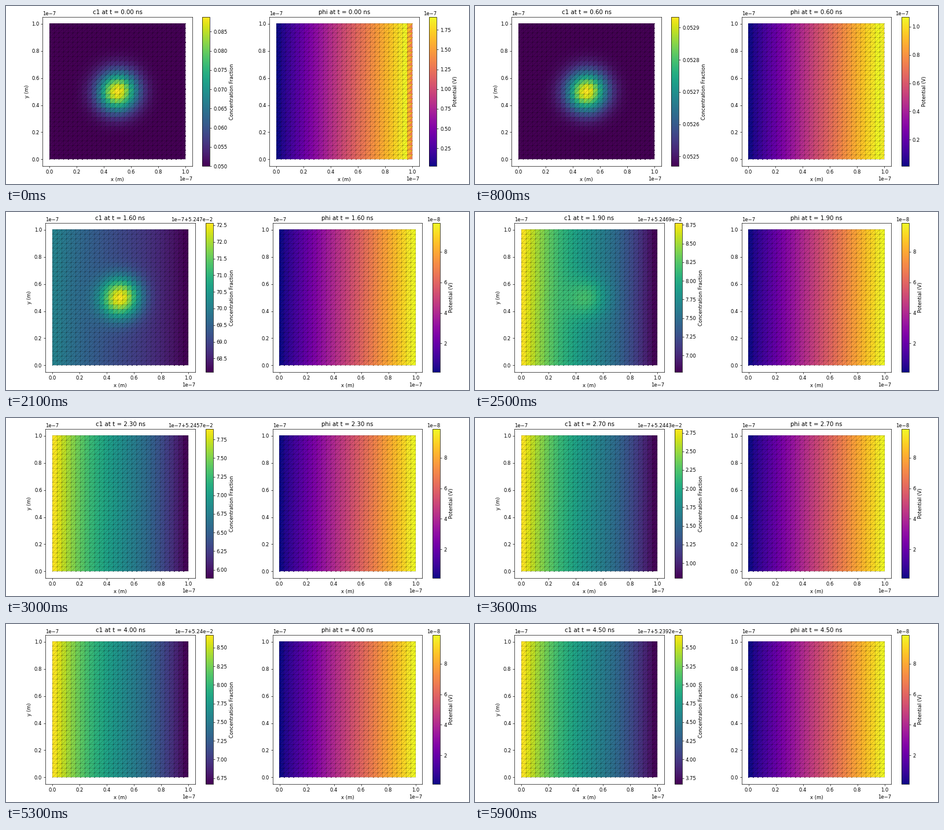
Animation of 800 by 308 pixels, one loop 6 s. Source, as a matplotlib script:

```python
import numpy as np
import matplotlib.pyplot as plt
from matplotlib.animation import FuncAnimation
from matplotlib.colors import Normalize
from matplotlib.tri import Triangulation

DPI = 800 / 13
FRAMES = 60
T_END = 4.5      # ns
N = 30           # mesh points per side
SIZE = 1e-7      # side of the square domain, m
MARGINS = dict(left=0.125, right=0.9, bottom=0.11, top=0.88, wspace=0.2)

# slow loss of the mean concentration, as (step, amount lost)
LOSS = [(0, 0), (8, 2e-7), (16, 1.413e-5), (25, 3.022e-5),
        (36, 5.682e-5), (47, 9.0933e-5), (59, 1.07533e-4)]


def build_mesh():
    """Regular grid, each cell split along its rising diagonal."""
    side = np.linspace(0, 1, N)
    x, y = (a.ravel() for a in np.meshgrid(side, side))
    node = np.arange(N * N).reshape(N, N)
    a, b = node[:-1, :-1].ravel(), node[:-1, 1:].ravel()
    c, d = node[1:, 1:].ravel(), node[1:, :-1].ravel()
    cells = np.vstack([np.column_stack([a, b, c]), np.column_stack([a, c, d])])
    return x, y, Triangulation(x * SIZE, y * SIZE, cells)


x, y, mesh = build_mesh()
blob = np.exp(-((x - 0.5) ** 2 + (y - 0.5) ** 2) / 0.02) - 0.0625
slope = 0.5 - x - 0.045 * np.sin(2 * np.pi * x)


def concentration(step, t):
    mean = 0.0525 - np.interp(step, *zip(*LOSS))
    return mean + 0.04 * np.exp(-7.257 * t) * blob + 2.065e-7 * slope


def potential(step, t):
    inner = 1 + 1.006 * np.exp(-3.48 * t)
    return 1e-7 * np.where(x > 0.999, 1, inner * x)


fig, axes = plt.subplots(1, 2, figsize=(13, 5.00501), dpi=DPI)


def add_panel(ax, name, field, cmap, label):
    faces = ax.tripcolor(mesh, field(0, 0), cmap=cmap)
    ax.triplot(mesh, "k-", linewidth=0.2)
    fig.colorbar(faces, ax=ax, label=label)
    ax.set_aspect("equal")
    ax.set_xlabel("x (m)")
    return ax, name, field, faces


panels = [
    add_panel(axes[0], "c1", concentration, "viridis", "Concentration Fraction"),
    add_panel(axes[1], "phi", potential, "plasma", "Potential (V)"),
]
axes[0].set_ylabel("y (m)")


def update(step):
    t = T_END * step / (FRAMES - 1)
    for ax, name, field, faces in panels:
        values = field(step, t)[mesh.triangles].mean(axis=1)
        faces.set_array(values)
        # a fresh norm also resets the colorbar ticks and offset
        faces.set_norm(Normalize(values.min(), values.max()))
        ax.set_title(f"{name} at t = {round(t, 1):.2f} ns")
    # the fit depends on where it starts, so start from the same margins
    fig.subplots_adjust(**MARGINS)
    fig.tight_layout()


anim = FuncAnimation(fig, update, frames=FRAMES, interval=100,
                     init_func=lambda: update(0), repeat=True, repeat_delay=0)
plt.show()
```
